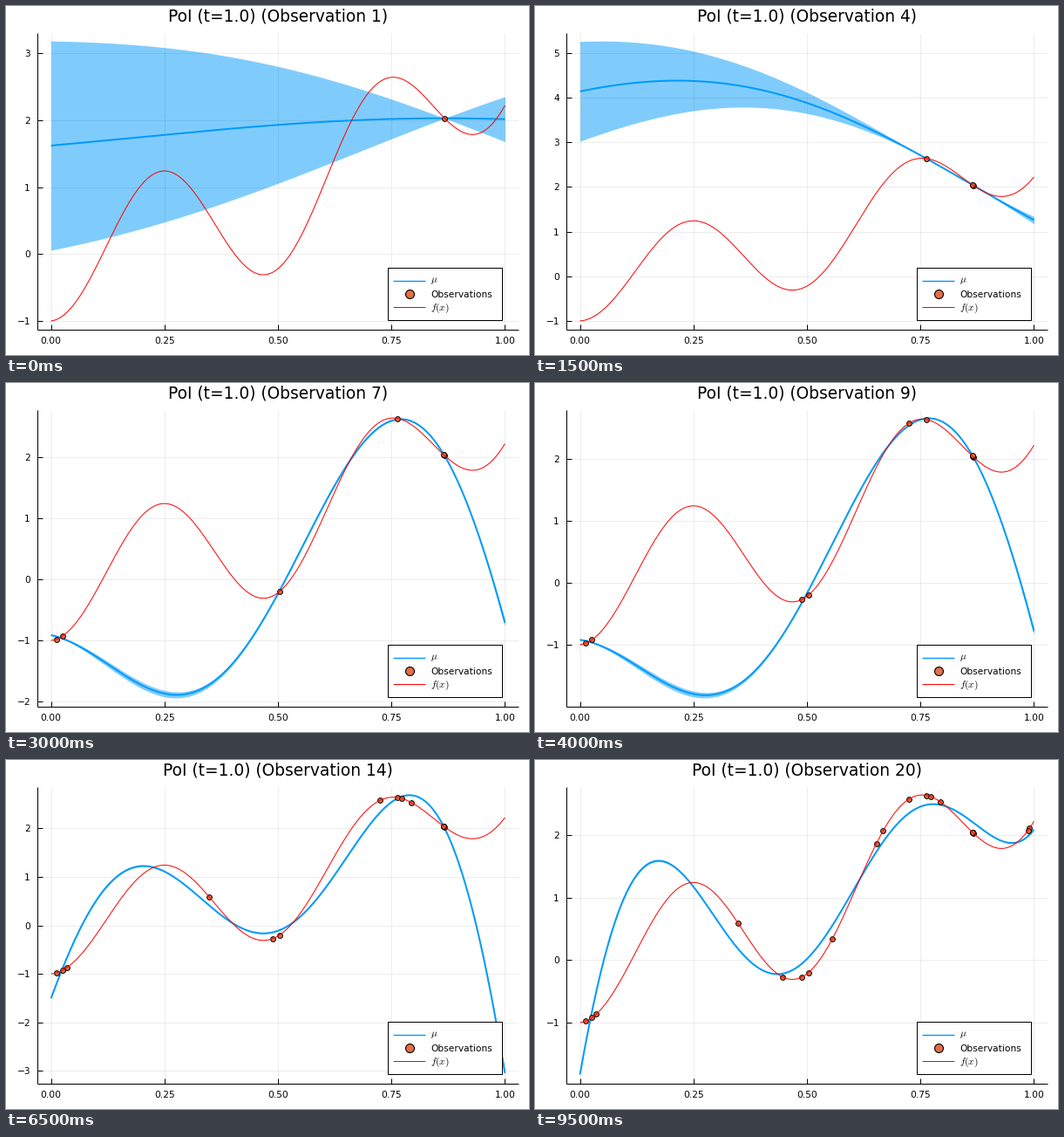
A matplotlib script that plays this animation: 600 px wide and 400 px high, repeating every 10000 ms.

```python
import numpy as np
import matplotlib.pyplot as plt
from matplotlib.animation import FuncAnimation
from matplotlib.patches import Rectangle

plt.rcParams["font.family"] = "DejaVu Sans"
plt.rcParams["mathtext.fontset"] = "cm"

PX = 0.72  # points per pixel at 100 dpi
BLUE, ORANGE = "#009afa", "#e26f46"
TOP, BOTTOM, RIGHT = 30.5, 370.6, 588

# Gaussian process: constant mean, squared-exponential kernel
PRIOR_MEAN, NOISE = 1.285, 5e-5
EARLY = dict(length=.686, variance=3.06)
REFIT = dict(length=.47, variance=1.8)
REFIT_AT = 5

# Sample positions in the order they are taken
SAMPLES = np.array([
    .867, .8655, .864, .763, .503, .012, .026, .488, .724, .348,
    .864, .036, .773, .794, .653, .447, .668, .556, .990, .987])

grid_x = np.linspace(0, 1, 401)


def objective(x):
    trend = x * (.437 + 1.63 * x + 1.06 * x**2)
    bend = -.9 * x * (x - .467) * (x - .755) * (x - 1)
    return -np.cos(13 * x) + trend + bend


def posterior(xs, ys, length, variance):
    def kernel(a, b):
        return variance * np.exp(-(a[:, None] - b) ** 2 / (2 * length**2))

    cov = kernel(xs, xs) + NOISE * np.eye(len(xs))
    cross = kernel(xs, grid_x)
    weights = np.linalg.solve(cov, cross)
    mean = PRIOR_MEAN + (ys - PRIOR_MEAN) @ weights
    var = variance - np.sum(cross * weights, axis=0)
    return mean, np.sqrt(np.maximum(var, 0))


fig = plt.figure(figsize=(6, 4), dpi=100, facecolor="white")
ax = fig.add_axes([0, 0, 1, 1])


def line(xs, ys, color, width, **kw):
    ax.plot(xs, ys, color=color, lw=width * PX, solid_capstyle="butt", **kw)


def text(x, y, label, size=10.67, ha="left"):
    ax.text(x, y, label, fontsize=size * PX, ha=ha, va="baseline", color="black")


def dots(xs, ys, size, edge, **kw):
    ax.plot(xs, ys, "o", ms=size * PX, mfc=ORANGE, mec="black", mew=edge * PX, **kw)


def draw_legend(x=438.3):
    ax.add_patch(Rectangle((x, 299.5), 131, 60.5, fc="white", ec="black",
                           lw=PX, zorder=3))
    line([x + 6, x + 43], [314.7] * 2, BLUE, 1.4, zorder=4)
    line([x + 6, x + 43], [345] * 2, "red", 1, zorder=4)
    dots([x + 24.5], [330], 10, 1.1, zorder=4)
    for y, label, size in ((317, r"$\mu$", 11.3), (334, "Observations", 10.67),
                           (348.5, "$f(x)$", 11.3)):
        text(x + 48.7, y, label, size)


def draw(frame):
    n = frame + 1
    xs = SAMPLES[:n]
    ys, truth = objective(xs), objective(grid_x)
    mean, sd = posterior(xs, ys, **(EARLY if n < REFIT_AT else REFIT))

    low = min((mean - sd).min(), truth.min())
    high = max((mean + sd).max(), truth.max())
    pad = .03 * (high - low)
    low, high = low - pad, high + pad
    wide = high - low > 9
    step, digits = (2.5, 1) if wide else (1, 0)
    left = 45 if wide else 36

    def to_x(x):
        return left + (RIGHT - left) * (x + .03) / 1.06

    def to_y(y):
        return BOTTOM - (BOTTOM - TOP) * (y - low) / (high - low)

    ax.clear()
    ax.set(xlim=(0, 600), ylim=(400, 0))
    ax.axis("off")

    x_ticks = np.linspace(0, 1, 5)
    y_ticks = step * np.arange(np.ceil(low / step), np.floor(high / step) + 1)
    for t in x_ticks:
        line([to_x(t)] * 2, [TOP, BOTTOM], "black", 1, alpha=.07)
    for t in y_ticks:
        line([left, RIGHT], [to_y(t)] * 2, "black", 1, alpha=.07)

    px = to_x(grid_x)
    ax.fill_between(px, to_y(mean - sd), to_y(mean + sd), color=BLUE,
                    alpha=.5, lw=0)
    line(px, to_y(mean), BLUE, 2)
    dots(to_x(xs), to_y(ys), 5.8, 1)
    line(px, to_y(truth), "red", 1)

    line([left, left], [TOP, BOTTOM], "black", 1)
    line([left, RIGHT], [BOTTOM, BOTTOM], "black", 1)
    for t in x_ticks:
        line([to_x(t)] * 2, [BOTTOM - 5.5, BOTTOM], "black", 1)
        text(to_x(t), 386.7, f"{t:.2f}", ha="center")
    for t in y_ticks:
        line([left, left + 5.5], [to_y(t)] * 2, "black", 1)
        label = f"{t + 0.0:.{digits}f}".replace("-", "\u2212")
        text(left - 8, to_y(t) + 4, label, ha="right")

    text((left + RIGHT) / 2, 18, f"PoI (t=1.0) (Observation {n})", 18.67, "center")
    draw_legend()
    return []


anim = FuncAnimation(fig, draw, frames=20, interval=500, init_func=lambda: [],
                     repeat=True, repeat_delay=0)
plt.show()
```
